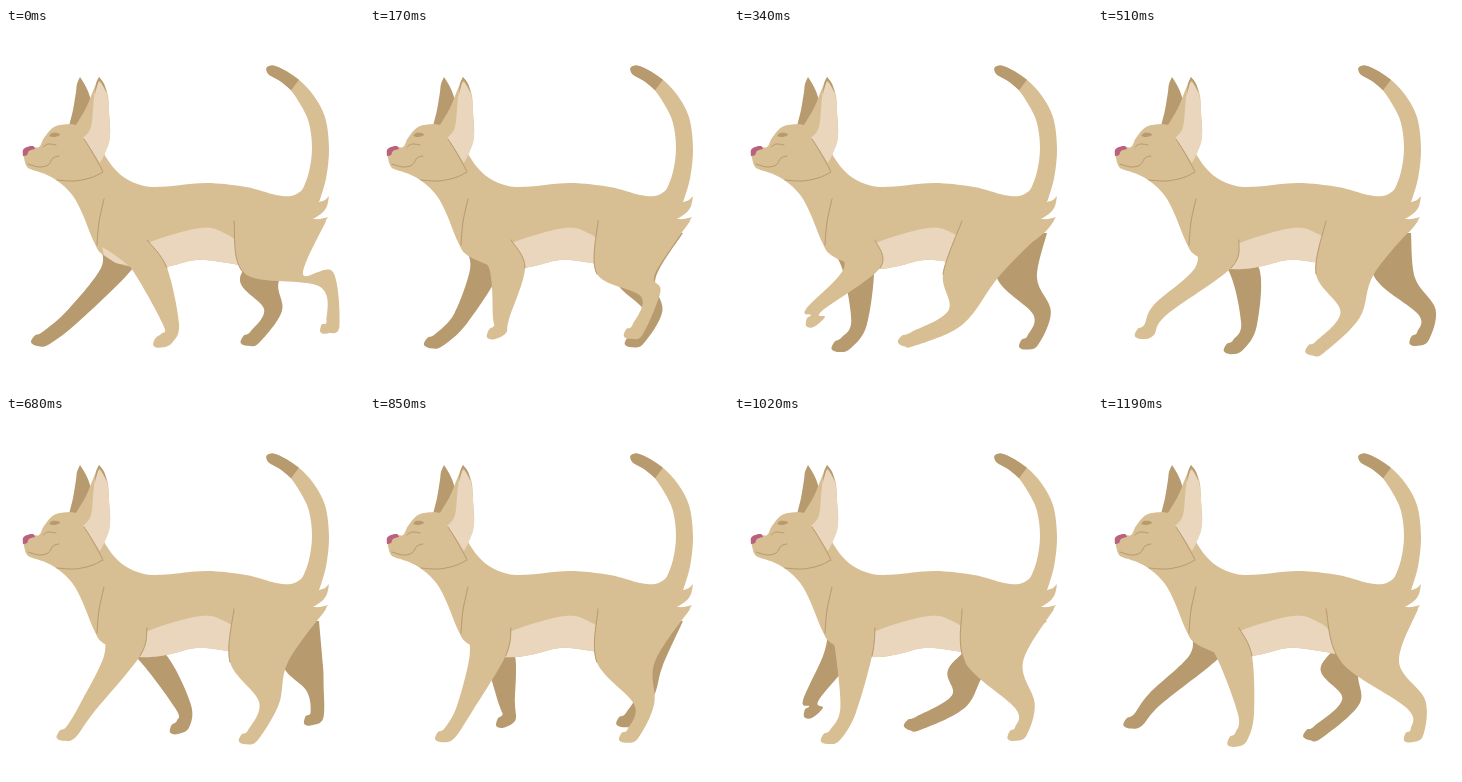
Animation of 358x360 px, one loop 1.36 s. Source, as an HTML page:

```html
<!DOCTYPE html>
<html lang="en">
<head>
<meta charset="utf-8">
<title>Walking cat</title>
<style>
html, body { margin: 0; width: 100%; height: 100%; overflow: hidden; background: #fff; }
svg { display: block; width: 100vw; height: 100vh; }
</style>
</head>
<body>
<svg id="stage" viewBox="0 0 358 360"></svg>
<script>
const TAN = '#d8be93', DARK = '#b79a6e', PALE = '#e9d6bc', PINK = '#b9617f';
const STEP = 170;
// Where each step of the walk falls among the key poses.
const STEPS = [0, 0.4, 1, 2, 3, 3.4, 4, 5];
const stage = document.getElementById('stage');

// Catmull-Rom spline through the points, drawn over the first n spans.
function spline(p, n = p.length - 1) {
  let d = 'M' + p[0];
  for (let i = 0; i < n; i++) {
    const a = p[i - 1] || p[i], b = p[i], c = p[i + 1], e = p[i + 2] || c;
    const h1 = b.map((v, k) => v + (c[k] - a[k]) / 6);
    const h2 = c.map((v, k) => v - (e[k] - b[k]) / 6);
    d += `C${h1} ${h2} ${c}`;
  }
  return d;
}

// Text form "x,y x,y ..."; a bar marks a corner.
const curve = text => text.split('|')
  .map(part => spline(part.trim().split(/\s+/).map(s => s.split(',').map(Number))))
  .join('').replace(/(?!^)M/g, 'L');

function unit(x, y) {
  const len = Math.hypot(x, y) || 1;
  return [x / len, y / len];
}

// Tapered limb along joints [x, y, radius]; the first `flat` cuts are horizontal.
function limb(joints, flat = 0) {
  const left = [], right = [];
  const last = joints.length - 1;
  const bone = i => unit(joints[i + 1][0] - joints[i][0], joints[i + 1][1] - joints[i][1]);
  let dir;
  joints.forEach(([x, y, r], i) => {
    const a = bone(Math.max(0, i - 1)), b = bone(Math.min(last - 1, i));
    dir = i < flat ? [0, 1] : unit(a[0] + b[0], a[1] + b[1]);
    left.push([x - dir[1] * r, y + dir[0] * r]);
    right.push([x + dir[1] * r, y - dir[0] * r]);
  });
  const [x, y, r] = joints[last];
  const cap = [x + dir[0] * r, y + dir[1] * r];
  return { left, right, d: spline([...left, cap, ...right.slice().reverse()]) };
}

function add(attrs, d) {
  const el = document.createElementNS('http://www.w3.org/2000/svg', 'path');
  for (const k in attrs) el.setAttribute(k, attrs[k]);
  if (d) el.setAttribute('d', d);
  stage.appendChild(el);
  return el;
}
const fill = (color, text) => add({ fill: color }, text && curve(text));
const line = text =>
  add({ fill: 'none', stroke: DARK, 'stroke-linecap': 'round' }, text && curve(text));

// Each key pose: thigh x, ankle x y, pad x y.
const legs = {
  nearFore: {
    root: [119, 212, 22], thigh: [240, 18], ankle: 8,
    keys: [
      [143, 165, 296, 161, 310], [128, 80, 282, 84, 288], [115, 62, 282, 51, 302],
      [116, 81, 292, 65, 316], [120, 114, 295, 101, 319], [136, 148, 298, 143, 321]]
  },
  nearHind: {
    root: [274, 193, 46], thigh: [246, 29], ankle: 10,
    keys: [
      [268, 320, 251, 327, 295], [238, 222, 289, 179, 311], [247, 252, 287, 222, 319],
      [253, 263, 287, 247, 319], [260, 291, 290, 287, 315], [272, 318, 288, 319, 316]]
  },
  farFore: {
    root: [112, 218, 18], thigh: [240, 16], ankle: 8,
    keys: [
      [111, 68, 287, 40, 310], [124, 125, 295, 112, 315], [145, 151, 296, 140, 317],
      [145, 177, 290, 177, 308], [105, 77, 284, 82, 291], [107, 57, 283, 40, 304]]
  },
  farHind: {
    root: [292, 205, 21], thigh: [250, 20], ankle: 9,
    keys: [
      [254, 267, 282, 249, 309], [283, 308, 285, 299, 312], [297, 329, 284, 325, 308],
      [297, 309, 272, 311, 299], [236, 225, 285, 185, 307], [243, 253, 285, 220, 316]]
  }
};

function legShape({ root, thigh, ankle, keys }, at) {
  const i = Math.floor(at), next = keys[(i + 1) % keys.length];
  const [tx, ax, ay, px, py] = keys[i].map((v, k) => v + (next[k] - v) * (at - i));
  // The toes bend forward from the line of the foot.
  const foot = unit(px - ax, py - ay);
  const toe = unit(foot[0] - 1.5, foot[1]);
  return limb([root, [tx, thigh[0], thigh[1]], [ax, ay, ankle], [px, py, 7],
    [px + toe[0] * 10, py + toe[1] * 10, 5.5]], 2);
}

const farHind = fill(DARK);
const farFore = fill(DARK);

// Far ear
fill(DARK, '63,98 67,82 70,64 71,56 74,49 | 74,49 79,57 83,66 84,74 80,98');

// Tail with its dark tip
const tail = [[304, 170, 10], [311.5, 147, 9], [314.5, 120, 8.5], [311, 92, 8.5],
  [301, 72, 8], [289, 57, 6.5], [277, 48, 5.8], [265, 42, 5]];
add({ fill: TAN }, limb(tail).d);
add({ fill: DARK }, limb(tail.slice(-3)).d);

// Head, near ear, back, rump and underside
fill(TAN, '17,124 23,119 33,119 38,110 48,99 63,96 70,97' +
  ' | 70,97 80,80 87,63 93,49 | 93,49 98,56 102,68 103,85 104,108 98,126' +
  ' | 98,126 107,139 119,150 138,158 160,158.5 200,155 240,159 270,167 285,168 295,163 300,155' +
  ' | 313,160 313,174 | 313,174 319,172 323,168 | 323,168 321,178 316,185 307,191' +
  ' | 307,191 314,191 322,189 | 322,189 310,205 280,225 238,238' +
  ' | 238,238 215,234 190,232 165,238 145,241 120,238' +
  ' | 120,238 97,227 88,214 77,187 69,171 60,160 50,152 39,146 24,141 20,137 18,130 17,124');

// Ear lining and tip
fill(PALE, '92,54 98,58 102,72 104,108 100,123 94,135 | 94,135 85,121 77,110 | 77,110 85,99 88,70 92,54');
fill(DARK, '93,49 98,56 101,66 | 101,66 97,58 93,53 89,66 | 89,66 90,56 93,49');

// Belly
fill(PALE, '134,218 147,213 165,207 188,201 205,200 218,205 228,211 238,222' +
  ' | 238,238 215,234 190,232 165,238 145,241 130,241');

const chest = fill(PALE, '96,219 106,225 122,237 | 122,237 110,235 98,227');
const nearHind = fill(TAN);
const nearFore = fill(TAN);
const elbow = line();
const hip = line();
line('98,171 93,194 91,217');

// Face
line('51,152 68,153 84,150 95,145 96,142 85,122 78,111');
line('22,136 33,139 42,137 47,130 53,128');
line('37,119 42,116 50,117');
fill(DARK, '43,108 46,105 51,105 54,107 48,109 43,108');
fill(PINK, '17,128 17,122 21,119 27,118 29,121 | 29,121 23,123 21,127 17,128');

let shown = -1;

function draw(now) {
  const step = Math.floor(now / STEP) % STEPS.length;
  if (step === shown) return;
  shown = step;
  const shape = {};
  for (const name in legs) shape[name] = legShape(legs[name], STEPS[step]);
  farHind.setAttribute('d', shape.farHind.d);
  farFore.setAttribute('d', shape.farFore.d);
  nearHind.setAttribute('d', shape.nearHind.d);
  nearFore.setAttribute('d', shape.nearFore.d);
  // Seams follow the upper edges of the near legs.
  elbow.setAttribute('d', spline(shape.nearFore.right, 1));
  hip.setAttribute('d', spline(shape.nearHind.left, 1));
  // The pale chest shows while the foreleg is fully drawn back.
  const drawnBack = shape.nearFore.left[1][0] > 122;
  chest.setAttribute('visibility', drawnBack ? 'visible' : 'hidden');
}

let start = null;
function tick(now) {
  if (start === null) start = now;
  draw(Math.max(0, now - start));
  requestAnimationFrame(tick);
}
draw(0);
requestAnimationFrame(tick);
</script>
</body>
</html>
```
